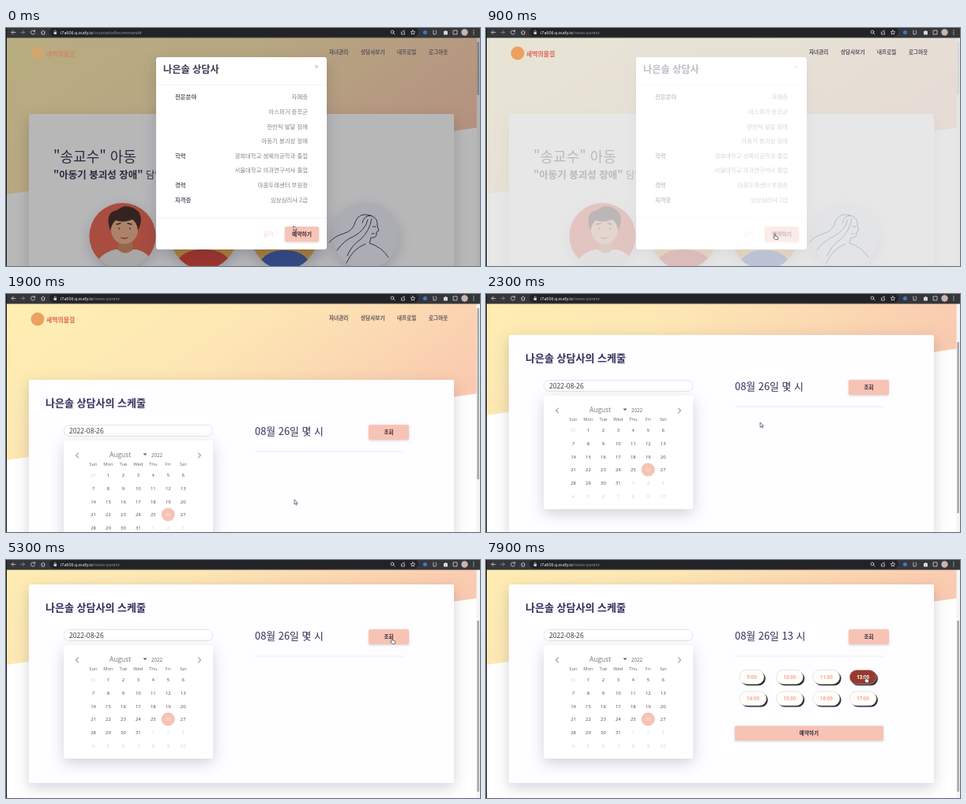
Recreate the animation shown at these times as an HTML page. Size 600 by 302 pixels, loop 8 s.

```html
<!DOCTYPE html>
<html lang="ko">
<head>
<meta charset="utf-8">
<title>상담 예약</title>
<style>
html, body { margin: 0; width: 100%; height: 100%; overflow: hidden; background: #fff; }
svg { display: block; width: 600px; height: 302px; font-family: "Noto Sans CJK KR", "Noto Sans", sans-serif; }
text { white-space: pre; }
.m { text-anchor: middle; }
.e { text-anchor: end; }
.b { font-weight: 700; }
.num { font-family: "Open Sans", "Noto Sans", sans-serif; }
.navy { fill: #302e5c; }
.ink { fill: #3a3a55; }
.soft { filter: drop-shadow(0 6px 9px rgba(40, 40, 70, .2)); }
.raised { filter: drop-shadow(0 1.5px 1.5px rgba(50, 50, 90, .22)); }
.line { fill: none; stroke-linecap: round; stroke-linejoin: round; }

/* every part shares one 8 s clock */
.scroll, .thumb, .veil, .page, .logo, .cursor, .pick, .pick-text { animation: 8s linear infinite; }
.url-a, .url-b, .arrow, .hand, .times, .ask, .answer { animation: 8s step-end infinite; }
.scroll { animation-name: scroll; }
.thumb { animation-name: thumb; }
.veil { animation-name: veil; }
.page { animation-name: page; }
.logo { animation-name: logo; }
.cursor { animation-name: cursor; }
.pick { animation-name: pick; }
.pick-text { animation-name: pick-text; }
.url-a { animation-name: url-a; }
.url-b { animation-name: url-b; }
.arrow { animation-name: arrow; }
.hand { animation-name: hand; }
.times { animation-name: times; }
.ask { animation-name: ask; }
.answer { animation-name: answer; }

@keyframes scroll {
  0%, 23.75% { transform: translateY(0); }
  28.75% { transform: translateY(-57px); }
  32.5%, 100% { transform: translateY(-78px); }
}
@keyframes thumb {
  0%, 23.75% { transform: translateY(0); }
  28.75% { transform: translateY(43px); }
  32.5%, 100% { transform: translateY(59px); }
}
@keyframes veil {
  0%, 6.25% { opacity: 0; }
  11.25% { opacity: .67; }
  13.1%, 100% { opacity: 1; }
}
@keyframes page {
  0%, 12.5% { opacity: 0; }
  15% { opacity: .47; }
  18.75%, 100% { opacity: 1; }
}
@keyframes logo {
  0%, 5% { opacity: .5; }
  9%, 100% { opacity: 1; }
}
@keyframes cursor {
  0% { transform: translate(364px, 251px); }
  3.75%, 23.75% { transform: translate(365px, 261px); }
  28%, 33.75% { transform: translate(347px, 163px); }
  43.75%, 50% { transform: translate(509px, 96px); }
  55%, 73.75% { transform: translate(488px, 99px); }
  80%, 100% { transform: translate(480px, 148px); }
}
@keyframes pick {
  0%, 79% { fill: #fffefa; }
  80.5%, 93.75% { fill: #f8bfae; }
  95.5%, 100% { fill: #963a2f; }
}
@keyframes pick-text {
  0%, 79% { fill: #f2ae9c; }
  80.5%, 93.75% { fill: #3a2c30; }
  95.5%, 100% { fill: #fff; }
}
@keyframes url-a { 0% { opacity: 1; } 6.25%, 100% { opacity: 0; } }
@keyframes url-b { 0% { opacity: 0; } 6.25%, 100% { opacity: 1; } }
@keyframes arrow { 0% { opacity: 1; } 3.75% { opacity: 0; } 13% { opacity: 1; } 43%, 100% { opacity: 0; } }
@keyframes hand { 0% { opacity: 0; } 3.75% { opacity: 1; } 13% { opacity: 0; } 43%, 100% { opacity: 1; } }
@keyframes times { 0% { opacity: 0; } 71.25%, 100% { opacity: 1; } }
@keyframes ask { 0% { opacity: 1; } 94.5%, 100% { opacity: 0; } }
@keyframes answer { 0% { opacity: 0; } 94.5%, 100% { opacity: 1; } }
</style>
</head>
<body>
<svg viewBox="0 0 600 302">
  <defs>
    <linearGradient id="warm" x1="0" y1="0" x2="1" y2=".5">
      <stop offset="0" stop-color="#fff0b2"/>
      <stop offset=".5" stop-color="#fde6b4"/>
      <stop offset="1" stop-color="#facab0"/>
    </linearGradient>
    <path id="slope" d="M0 0H600V126L0 211Z" fill="url(#warm)"/>
    <clipPath id="c1"><circle cx="147.5" cy="264" r="42"/></clipPath>
  </defs>
  <rect width="600" height="302" fill="#fff"/>

  <!-- counsellor list -->
  <g>
    <use href="#slope"/>
    <rect class="soft" x="29" y="109" width="538" height="260" rx="2" fill="#fefdff"/>
    <text class="ink" x="60" y="170" font-size="18">"송교수" 아동</text>
    <text class="ink" x="60" y="190.500" font-size="12.500"><tspan class="b">"아동기 붕괴성 장애"</tspan> 담당</text>
    <g class="soft">
      <circle cx="147.5" cy="264" r="42" fill="#e96b57"/>
      <circle cx="250" cy="264" r="42" fill="#f2b04e"/>
      <circle cx="352.500" cy="264" r="42" fill="#e9b155"/>
      <circle cx="455" cy="264" r="42" fill="#edeff6"/>
    </g>
    <g clip-path="url(#c1)">
      <path d="M111 310Q113 288 138 281H165Q186 286 190 310Z" fill="#e9e6e6"/>
      <path d="M142 268H160V282Q151 289 142 282Z" fill="#d08d6c"/>
      <ellipse cx="150" cy="256" rx="17" ry="18" fill="#efb492"/>
      <path d="M132 257Q124 234 141 231Q151 222 164 230Q176 238 167 257Q166 247 160 243Q148 248 139 244Q134 248 132 257Z" fill="#49302f"/>
      <g class="line" stroke="#49302f" stroke-width="1.300">
        <path d="M140 249l5-1M154 248l5 1M143 254v1M157 254v1"/>
        <path d="M146 266q4 2 8 0" stroke="#a63e38"/>
      </g>
    </g>
    <path d="M219 292Q229 281 250 281Q272 281 281 292Q268 306 250 306Q231 306 219 292Z" fill="#d84a3e"/>
    <path d="M323 294Q334 281 353 282Q373 282 382 294Q370 306 353 306Q335 306 323 294Z" fill="#4566b8"/>
    <g class="line" stroke="#3d4778" stroke-width="1">
      <path d="M451 247Q453 238 462 238Q471 241 470 251L472 257L469 259Q470 267 462 266L460 273Q476 278 484 291"/>
      <path d="M462 238Q447 233 442 246Q440 257 427 261Q416 264 409 272"/>
      <path d="M458 243Q455 256 441 264Q428 269 419 282"/>
      <path d="M463 242Q460 258 449 268Q437 276 432 289"/>
      <path d="M455 274Q439 280 431 298M464 252h4M463 261h3"/>
    </g>
    <rect x="596" y="12" width="4" height="290" fill="#f4f4f4"/>
    <rect x="596.300" y="18" width="2.700" height="67" fill="#b4b4b6"/>
    <rect width="600" height="302" opacity=".28"/>
    <rect class="soft" x="190" y="37" width="216" height="244" rx="3" fill="#fff"/>
    <path d="M190 72H406M190 241H406" stroke="#e9ebef" stroke-width=".7"/>
    <text class="ink b" x="199" y="56.500" font-size="12.2">나은솔 상담사</text>
    <path d="M391 47l4 4m0-4l-4 4" stroke="#aaa" stroke-width=".7"/>
    <g id="profile" font-size="7.4"></g>
    <text x="326" y="263.500" font-size="7" fill="#f2c9bc">닫기</text>
    <rect class="raised" x="353" y="252" width="43" height="19" rx="2" fill="#f8c4b5"/>
    <text class="m b" x="374.500" y="263.700" font-size="6.8" fill="#33283a">예약하기</text>
  </g>
  <rect class="veil" width="600" height="302" fill="#fff"/>

  <!-- schedule -->
  <g class="scroll">
    <g class="page">
      <use href="#slope"/>
      <rect class="soft" x="29" y="109" width="538" height="252" rx="2" fill="#fefdff"/>
      <text class="navy b" x="50" y="142.500" font-size="13">나은솔 상담사의 스케줄</text>
      <rect x="73.500" y="166.500" width="188" height="14" rx="6" fill="#fff" stroke="#dcdde4" stroke-width=".8"/>
      <text class="num" x="80" y="176.800" font-size="8.4" fill="#333">2022-08-26</text>
      <rect class="soft" x="73" y="186" width="189" height="144" rx="2" fill="#fff"/>
      <path class="line" d="M91.500 202l-3 3 3 3M243.500 202l3 3-3 3" stroke="#555" stroke-width=".9"/>
      <text class="num" x="131" y="206.500" font-size="8.4" fill="#777">August</text>
      <path d="M173.500 202.500h5l-2.500 2.500z" fill="#555"/>
      <text class="num" x="184" y="206.500" font-size="6.2" fill="#666">2022</text>
      <circle cx="205.200" cy="280" r="8.500" fill="#f7c2b3"/>
      <g id="calendar" class="num m" font-size="5.9"></g>

      <g class="navy" font-size="12.9">
        <text class="ask" x="315" y="179">08월 26일 몇 시</text>
        <text class="answer" x="315" y="179">08월 26일 13 시</text>
      </g>
      <rect class="raised" x="459" y="166" width="51" height="19" rx="2" fill="#f7c3b4"/>
      <text class="m b" x="484.500" y="177.800" font-size="6.6" fill="#33283a">조회</text>
      <path d="M315 200H503" stroke="#e6e7ec" stroke-width=".8"/>
      <g id="times" class="times num m b" font-size="6.200"></g>
      <g class="answer">
        <rect class="raised" x="315" y="288.500" width="188" height="18.500" rx="1.500" fill="#f7c3b4"/>
        <text class="m b" x="409" y="300" font-size="6.600" fill="#33283a">예약하기</text>
      </g>
    </g>

    <!-- header -->
    <g class="logo">
      <circle cx="40" cy="32" r="8.500" fill="#eda05f"/>
      <text class="b" x="51" y="35.500" font-size="7.900" fill="#e0655a">새벽의물결</text>
    </g>
    <g id="nav" class="b" font-size="6.650" fill="#5a525c"></g>
  </g>

  <g class="page">
    <rect x="595.500" y="12" width="4.500" height="290" fill="#f4f4f4"/>
    <rect class="thumb" x="596.300" y="18" width="2.700" height="217" fill="#a9aaab"/>
  </g>

  <!-- browser bar -->
  <rect width="600" height="12.500" fill="#35363a"/>
  <rect x="55" y="-1" width="467" height="12" rx="6" fill="#222326"/>
  <g class="line" stroke="#d4d5d8" stroke-width=".8">
    <path d="M12 5.500H7m2.300-2.300L7 5.500l2.300 2.300"/>
    <path d="M18.500 5.500h5m-2.300-2.300l2.300 2.300-2.300 2.300" stroke="#8b8c90"/>
    <path d="M36.200 4A2.600 2.600 0 1 0 36.600 6.300M36.600 2.500V4.300H34.800"/>
    <path d="M44.500 5.500L47 3l2.500 2.500M45.300 5V8h3.400V5"/>
    <circle cx="489" cy="5" r="1.900"/><path d="M490.500 6.500l1.700 1.700"/>
    <path d="M500.500 5v3h4V5M502 5.500q0-2.500 2.500-2.500"/>
    <path d="M515 2.800l.8 1.800 2 .2-1.500 1.300.4 2-1.700-1-1.700 1 .4-2-1.500-1.300 2-.2z"/>
    <path d="M541 3v5h2M544 3q2 2.500 0 5"/>
    <rect x="566.500" y="3" width="4.500" height="5"/>
  </g>
  <rect x="60.500" y="5" width="3.500" height="3" fill="#c9cacd"/>
  <path d="M61.300 5V4a1 1 0 0 1 2 0V5" class="line" stroke="#c9cacd" stroke-width=".6"/>
  <circle cx="530.500" cy="5.500" r="2.600" fill="#3f73c8"/>
  <path d="M554 4h1.500a1 1 0 0 1 2 0H559v4.500h-5z" fill="#d4d5d8"/>
  <circle cx="580.500" cy="5.500" r="4.200" fill="#cdb4aa"/>
  <g fill="#d4d5d8"><circle cx="592" cy="3" r=".65"/><circle cx="592" cy="5.500" r=".65"/><circle cx="592" cy="8" r=".65"/></g>
  <g font-family="'Noto Sans', sans-serif" font-size="5.300">
    <text x="69" y="7.700" fill="#f1f1f2">i7a606.q.ssafy.io</text>
    <g fill="#909196">
      <text class="url-a" x="110.300" y="7.700">/counselorRecommend#</text>
      <text class="url-b" x="110.300" y="7.700">/resev-parent</text>
    </g>
  </g>
  <rect width="1" height="302" fill="#111"/>

  <g class="cursor" stroke="#222" stroke-width=".6" stroke-linejoin="round" fill="#fff">
    <path class="arrow" d="M0 0V6L1.400 4.800L2.400 7L3.400 6.500L2.500 4.500H4.300Z"/>
    <path class="hand" d="M0 .6Q.7-.4 1.300.6V3L4 3.500Q4.900 3.800 4.700 5L4.200 7.700H1L-1.300 4.700Q-1.200 3.700 0 4.500Z"/>
  </g>
</svg>
<script>
const fill = (id, parts) => document.getElementById(id).innerHTML = parts.join("");
const text = (x, y, s, attrs = "") => `<text x="${x}" y="${y}" ${attrs}>${s}</text>`;

fill("nav", [[409, "자녀관리"], [449, "상담사보기"], [495, "내프로필"], [535, "로그아웃"]]
  .map(([x, s]) => text(x, 33.3, s)));

const profile = [
  ["전문분야", "자폐증"], ["", "아스퍼거 증후군"], ["", "전반적 발달 장애"], ["", "아동기 붕괴성 장애"],
  ["학력", "경희대학교 생체의공학과 졸업"], ["", "서울대학교 의과연구석사 졸업"],
  ["경력", "마음두레센터 부원장"], ["자격증", "임상심리사 2급"]
];
fill("profile", profile.map(([label, value], i) => {
  const y = 90.4 + i * 18.6;
  return text(214, y, label, 'class="b" fill="#62626e"') + text(382, y, value, 'class="e" fill="#84848c"');
}));

const colX = i => 110.5 + i * 18.95;
const days = ["Sun", "Mon", "Tue", "Wed", "Thu", "Fri", "Sat"]
  .map((s, i) => text(colX(i), 217.7, s, 'fill="#666"'));
for (let i = 0; i < 42; i++) {
  const inMonth = i > 0 && i < 32;
  const color = i === 26 ? "#fff1ec" : inMonth ? "#484850" : "#cfcfd4";
  days.push(text(colX(i % 7), 232.1 + Math.floor(i / 7) * 16.75, (i + 30) % 31 + 1, `fill="${color}"`));
}
fill("calendar", days);

const hours = [9, 10, 11, 13, 14, 15, 16, 17];
fill("times", hours.map((h, i) => {
  const x = 321 + (i % 4) * 46.4, y = i < 4 ? 217.5 : 244.8, w = h < 10 ? 31 : 34;
  const pill = (d, attrs) => `<rect x="${x + d}" y="${y + d}" width="${w}" height="18" rx="9" ${attrs}/>`;
  const picked = h === 13;
  return pill(1.8, 'fill="#2b2b2e"')
    + pill(0, `fill="#fffefa" stroke="#d9c9c3" stroke-width=".5" ${picked ? 'class="pick"' : ""}`)
    + text(x + w / 2, y + 11.2, h + ":00", `fill="#f2ae9c" ${picked ? 'class="pick-text"' : ""}`);
}));
</script>
</body>
</html>
```
